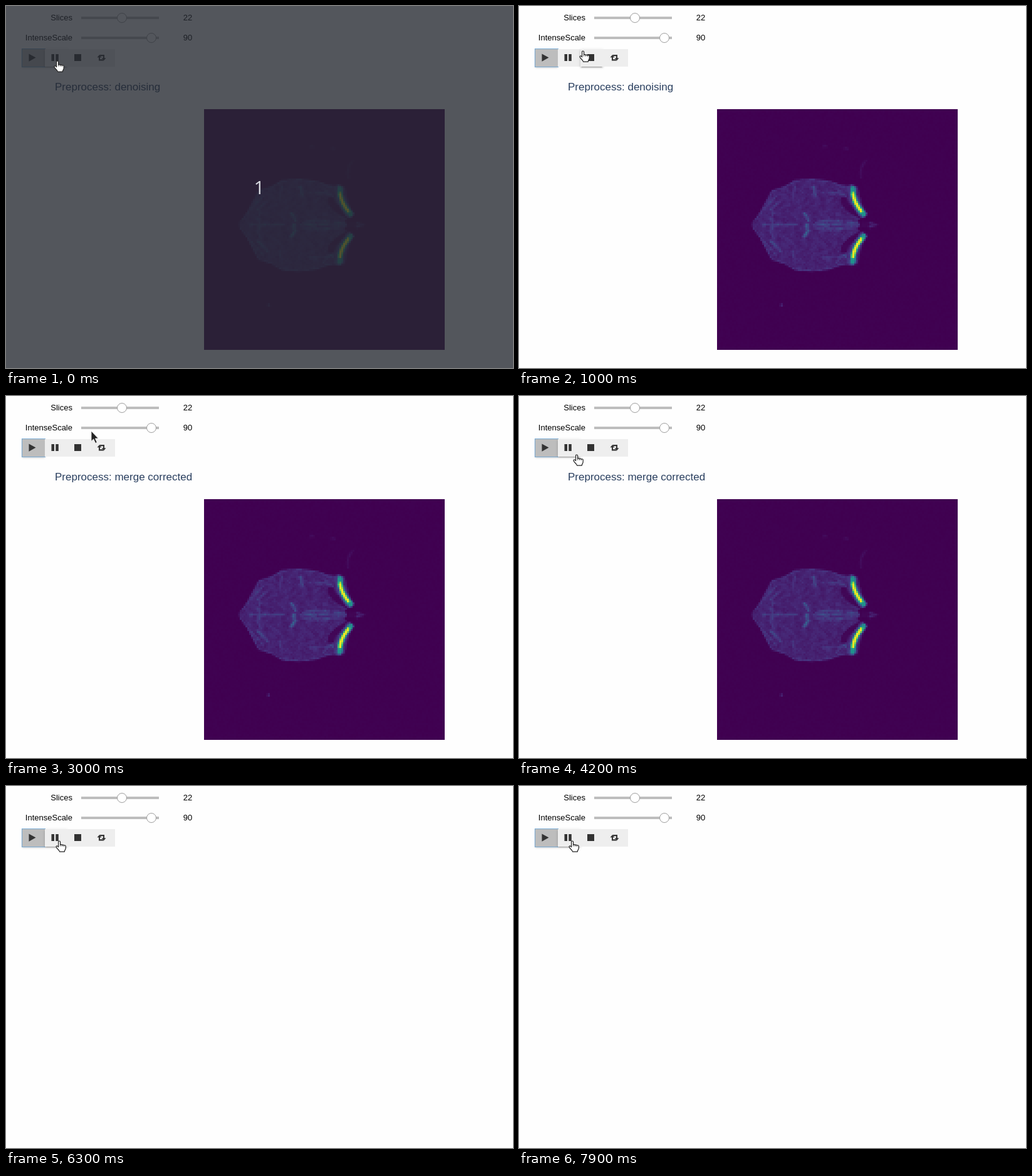
Animation, 809 px wide and 579 px high, one loop 8 s. Source, as an HTML page with a canvas:

```html
<!DOCTYPE html>
<html lang="en">
<head>
<meta charset="utf-8">
<title>Slice viewer</title>
<style>
html, body { margin: 0; width: 100%; height: 100%; overflow: hidden; background: #fefefe; }
#stage { position: relative; width: 809px; height: 579px; overflow: hidden;
  font-family: "Liberation Sans", Arial, sans-serif; }
#stage > * { position: absolute; }
svg.layer { left: 0; top: 0; width: 809px; height: 579px; }
svg text { font-size: 13px; }
svg .title { font-size: 17px; fill: #2a3f5f; }
.knob { fill: #fff; stroke: #9e9e9e; }

.btn { top: 69px; width: 36px; height: 28px; background: #eee; }
.play { left: 26px; background: #bdbdbd;
  box-shadow: 0 0 0 1px #78a9d2, 0 2px 3px rgba(0,0,0,.18); }
.pause { left: 62px; }
.stop { left: 98px; }
.loop { left: 134px; width: 40px; }
.btn i { position: absolute; inset: 0; background: #eee; visibility: hidden;
  box-shadow: 0 2px 2px rgba(0,0,0,.14), 0 3px 1px -2px rgba(0,0,0,.2), 0 1px 5px rgba(0,0,0,.12); }

#scan { left: 316px; top: 165px; width: 384px; height: 385px; image-rendering: pixelated; }
#veil { inset: 0; background: rgba(38,41,49,.79); }
#count { left: 0; top: 269px; width: 808px; line-height: 41px; text-align: center;
  font: 30px/41px "Open Sans", "Noto Sans", sans-serif; color: #d6d7de; }

.anim, .btn i, #scan, #veil, #count {
  animation-duration: 8s; animation-timing-function: step-end; animation-iteration-count: infinite; }
.pause i { animation-name: overPause; }
.stop i { animation-name: overStop; }
#scan { animation-name: scan; }
#veil { animation-name: veil; }
#count { animation-name: count; }
#first { animation-name: first; }
#second { animation-name: second; }
#third { animation-name: third; }
#pointer { animation-name: move; }
#hand { animation-name: hand; }
#arrow { animation-name: arrow; }

@keyframes overPause {
  0%, 51.25%, 100% { visibility: visible; }
  2.5% { visibility: hidden; }
}
@keyframes overStop {
  0%, 33.75%, 51.25%, 100% { visibility: hidden; }
  2.5%, 47.5% { visibility: visible; }
}
@keyframes scan {
  0%, 28.75%, 80% { visibility: visible; }
  26.25%, 78.75%, 98.75%, 100% { visibility: hidden; }
}
@keyframes first { 0% { visibility: visible; } 26.25%, 100% { visibility: hidden; } }
@keyframes second { 0%, 78.75%, 100% { visibility: hidden; } 28.75% { visibility: visible; } }
@keyframes third { 0%, 98.75%, 100% { visibility: hidden; } 80% { visibility: visible; } }
@keyframes veil {
  0% { opacity: 1; }
  1.25% { opacity: .75; }
  2.5% { opacity: .5; }
  3.75% { opacity: .25; }
  5%, 100% { opacity: 0; }
}
@keyframes count { 0% { opacity: 1; } 1.25%, 100% { opacity: 0; } }
@keyframes hand { 0%, 47.5%, 100% { visibility: visible; } 33.75% { visibility: hidden; } }
@keyframes arrow { 0%, 47.5%, 100% { visibility: hidden; } 33.75% { visibility: visible; } }
@keyframes move {
  0% { transform: translate(76px, 87px); }
  1.25% { transform: translate(84px, 85px); }
  2.5% { transform: translate(93px, 80px); }
  3.75% { transform: translate(100px, 77px); }
  5% { transform: translate(103px, 75px); }
  11.25% { transform: translate(100px, 73px); }
  12.5% { transform: translate(96px, 71px); }
  30% { transform: translate(98px, 71px); }
  31.25% { transform: translate(102px, 70px); }
  33.75% { transform: translate(116px, 67px); }
  36.25% { transform: translate(126px, 61px); }
  37.5% { transform: translate(136px, 56px); }
  46.25% { transform: translate(130px, 62px); }
  47.5% { transform: translate(116px, 72px); }
  48.75% { transform: translate(104px, 80px); }
  50% { transform: translate(94px, 86px); }
  51.25% { transform: translate(89px, 91px); }
  52.5% { transform: translate(86px, 93px); }
  55% { transform: translate(80px, 91px); }
  57.5% { transform: translate(79px, 88px); }
  62.5% { transform: translate(80px, 87px); }
  68.75%, 100% { transform: translate(79px, 87px); }
}
</style>
</head>
<body>
<div id="stage">
  <div class="btn play"></div>
  <div class="btn pause"><i></i></div>
  <div class="btn stop"><i></i></div>
  <div class="btn loop"></div>
  <canvas id="scan" width="128" height="128"></canvas>

  <svg class="layer">
    <text x="106" y="23" text-anchor="end">Slices</text>
    <text x="106" y="55" text-anchor="end">IntenseScale</text>
    <text x="290" y="23" text-anchor="middle">22</text>
    <text x="290" y="55" text-anchor="middle">90</text>
    <path d="M120 17h124v4h-124zM120 49h124v4h-124z" fill="#bdbdbd"/>
    <circle class="knob" cx="185" cy="19" r="7.5"/>
    <circle class="knob" cx="232" cy="51" r="7.5"/>
    <g fill="#333">
      <path d="M36.5 76.5L47.5 82.5 36.5 88.8z"/>
      <path d="M72.5 77h4.5v11h-4.5zM79.3 77h4.5v11h-4.5z"/>
      <path d="M109 77h11v11h-11z"/>
      <path d="M145.5 82.3l3.4-4 3.4 4h-2.3v3h4.4l1.8 2.2h-8.2v-5.2z"/>
      <path d="M159.5 83.2l-3.4 4-3.4-4h2.3v-3h-4.4l-1.8-2.2h8.2v5.2z"/>
    </g>
    <text id="first" class="title anim" x="78" y="135">Preprocess: denoising</text>
    <text id="second" class="title anim" x="78" y="135">Preprocess: merge corrected</text>
    <text id="third" class="title anim" x="78" y="135">Preprocess: EDDY corrected</text>
  </svg>

  <div id="veil"></div>
  <div id="count">1</div>

  <svg class="layer">
    <g id="pointer" class="anim">
      <g id="hand" class="anim" stroke="#222" stroke-width="1.2" stroke-linejoin="round">
        <path fill="#fff" d="M4.6 2.4c0-1.9 3-1.9 3 0v4.8c.6-1 2.6-.8 2.8.4c.6-.8 2.6-.6 2.8.5c.8-.7 3-.3 3 1v3.4c0 2.4-1.9 3-1.9 5.6h-7.8c0-2.2-4-4.6-5.2-7.2c-.8-1.8 1-2.8 2.2-1.5l1.1 1.2z"/>
        <path fill="none" stroke-width=".8" d="M7.6 7v2.6M10.4 7.6v2.2M13.2 8.1v2"/>
      </g>
      <path id="arrow" class="anim" fill="#222" stroke="#fff" stroke-width=".8"
        d="M0 0V16.4l3.7-3.5 3 6.6 2.6-1.2-2.9-6.3h5z"/>
    </g>
  </svg>
</div>

<script>
const SIZE = 128;
const ctx = document.getElementById('scan').getContext('2d', { willReadFrequently: true });
const ramp = ['400050', '472d7b', '3b528b', '2c728e', '21918c', '28ae80', '5ec962', 'addc30', 'fde725']
  .map(hex => [0, 2, 4].map(i => parseInt(hex.slice(i, i + 2), 16)));

let seed = 7;
const random = () => (seed = seed * 16807 % 2147483647) / 2147483647;
const gray = v => `rgb(${Array(3).fill(Math.round(v * 255))})`;

// Paths use stage x, and y measured from the midline at 350.
function half(side, draw) {
  ctx.setTransform(1 / 3, 0, 0, side / 3, -316 / 3, (350 - 165) / 3);
  draw();
}
function fill(v, d, sides = [1, -1]) {
  ctx.fillStyle = gray(v);
  sides.forEach(s => half(s, () => ctx.fill(new Path2D(d))));
}
function line(v, width, d, sides = [1, -1]) {
  ctx.strokeStyle = gray(v);
  ctx.lineWidth = width;
  sides.forEach(s => half(s, () => ctx.stroke(new Path2D(d))));
}

function drawTissue() {
  ctx.fillStyle = '#000';
  ctx.fillRect(0, 0, SIZE, SIZE);
  ctx.lineCap = 'round';
  fill(.095, 'M372 0L384-18 404-54Q425-58 440-70Q468-76 495-69L515-63 540-62 546-38 552-16 540-6 546 2H372z');
  line(.14, 3, 'M374-4L386-20 404-54Q425-58 440-70Q468-75 495-69L515-62 532-60');
  line(.15, 4, 'M390-24L410-46M402-24L416-38M440-60L436-40M484-52L514-50M506-58L520-46');
  line(.2, 5, 'M470-60L473-48', [1]);
  line(.2, 4, 'M402-26L418-42M515-38L522-50', [-1]);
  line(.23, 5, 'M455-18L462-8');
  line(.17, 4, 'M406-20Q400-10 404 0H390M474-4Q500-10 540-2');
  line(.17, 4, 'M404 0H444M470 0H545', [1]);
  line(.24, 6, 'M488 0H493M459 0V3', [1]);
  line(.015, 11, 'M518-40Q520-26 546-15');
  line(.01, 9, 'M548 0H556', [1]);
  line(.09, 4, 'M560-3L568 0L560 3', [1]);
  line(.2, 13, 'M531-58Q531-38 548-18');
  line(.5, 8, 'M533-58Q531-38 550-17');
  line(1, 5, 'M533-50Q534-37 546-22');
  line(.035, 4, 'M486-126H490M520-122H524M553-102Q543-94 546-76', [1]);
  line(.09, 5, 'M419 127V128', [1]);
}

// Adds grain and maps intensity onto the colour ramp.
function colorize() {
  const img = ctx.getImageData(0, 0, SIZE, SIZE);
  const px = img.data;
  for (let i = 0; i < px.length; i += 4) {
    const x = i / 4 % SIZE, y = Math.floor(i / 4 / SIZE);
    let v = px[i] / 255;
    if (v < .35) {
      const fold = Math.sin(x * .8 + 2 * Math.sin(y * .5)) * Math.sin(y * .7 + Math.sin(x * .4));
      v = v * (.82 + .3 * random() + .2 * fold) + .006 * random();
    }
    const at = Math.min(v, .999) * (ramp.length - 1);
    const k = Math.floor(at);
    ramp[k].forEach((c, j) => px[i + j] = c + (ramp[k + 1][j] - c) * (at - k));
  }
  ctx.putImageData(img, 0, 0);
}

drawTissue();
colorize();
</script>
</body>
</html>
```
